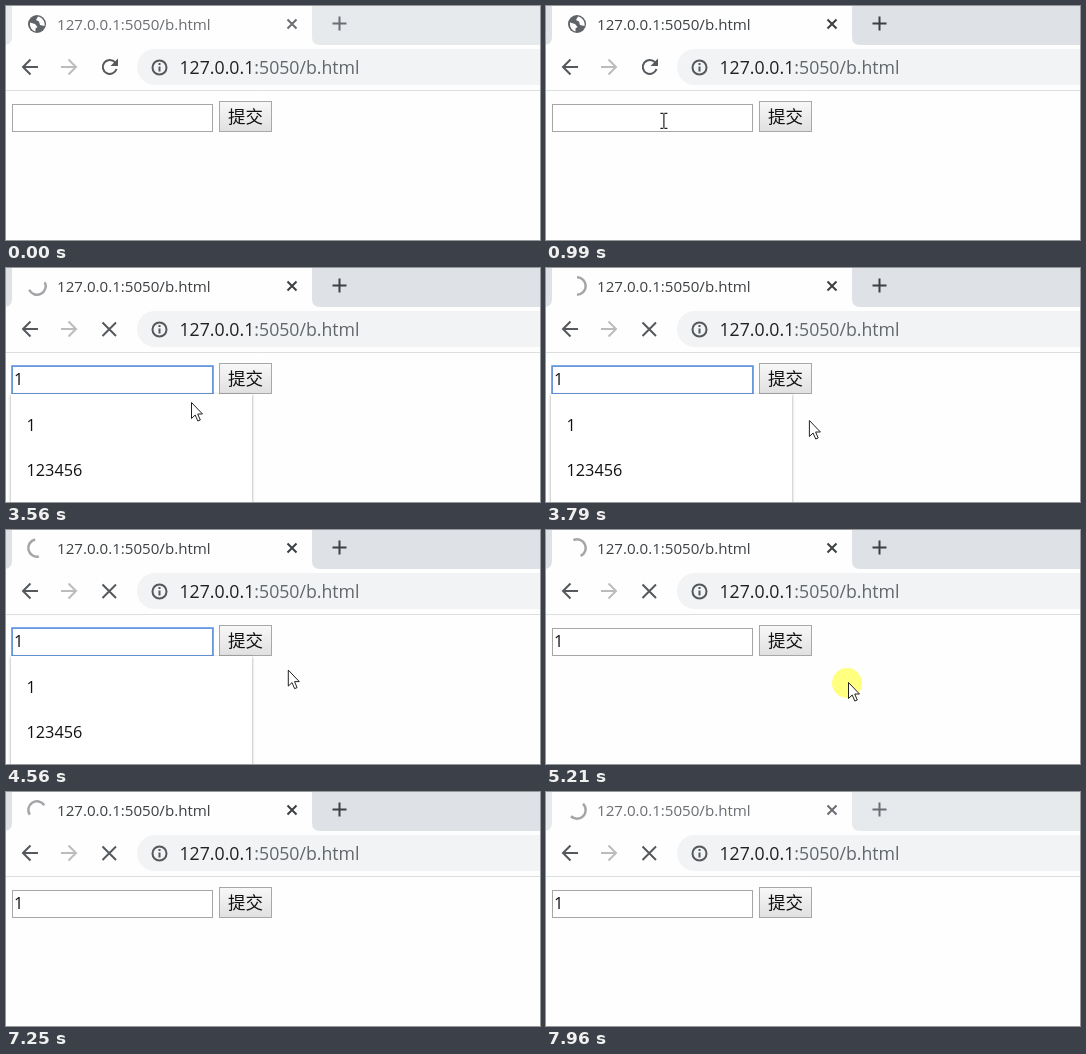
Recreate the animation shown at these times as an HTML page. Size 534 px wide and 234 px high, loop 8 s.

```html
<!DOCTYPE html>
<html lang="zh">
<head>
<meta charset="utf-8">
<title>b.html</title>
<style>
  html, body { margin: 0; width: 100%; height: 100%; overflow: hidden; background: #fefefe; }
  svg { display: block; font-family: "Open Sans", "Noto Sans", sans-serif; --strip: #e7eaed; --ink: #6a6d72; }
  svg.active { --strip: #dee1e6; --ink: #3c4043; }
  .line { fill: none; stroke: #55585c; stroke-width: 2; }
  .ink { stroke: var(--ink); }
  .field { font-size: 16.3px; fill: #111; }
</style>
</head>
<body>
<svg id="stage" width="534" height="234" viewBox="0 0 534 234">
  <rect width="534" height="234" fill="#fefefe"/>

  <!-- tab strip -->
  <rect width="534" height="39" fill="var(--strip)"/>
  <path d="M-2 39Q6 39 6 31V0H306V31Q306 39 314 39Z" fill="#fefefe"/>
  <g id="globe">
    <circle cx="31" cy="18" r="9" fill="#5f6368"/>
    <path d="M24 16.5l5 1.5 2.5 3-2 1.5v3c-4-1-6-5-5.500-9zM32 10.500l-2 3.500 3 1.500 1 3.500 4.500 1c.8-4.500-2-8.500-6.500-9.500z" fill="#fefefe"/>
  </g>
  <path id="spinner" fill="none" stroke="#a3a5a8" stroke-width="2.5"/>
  <text x="51" y="24" font-size="15.1" fill="var(--ink)">127.0.0.1:5050/b.html</text>
  <path class="line ink" d="M281.500 13.500l9 9m0-9l-9 9M326.500 17.500h14m-7-7v14"/>

  <!-- toolbar -->
  <path d="M0 84.500H534" stroke="#dcdee1"/>
  <path class="line" d="M32 61H17m7.500-7.500L17 61l7.500 7.500"/>
  <path class="line" d="M55 61h15m-7.500-7.500L70 61l-7.500 7.500" style="stroke:#babcbe"/>
  <g id="reload">
    <path class="line" d="M109 56.200a7 7 0 1 0 1.500 6.800"/>
    <path d="M112 52.500v7.500h-7.500z" fill="#55585c"/>
  </g>
  <path id="stop" class="line" d="M96.500 54.500l13.500 13.500m0-13.500l-13.500 13.500"/>
  <rect x="131" y="43" width="440" height="36" rx="18" fill="#f1f3f4"/>
  <circle class="line" cx="153.500" cy="61.500" r="7"/>
  <path class="line" d="M153.500 60.500v5m0-8.500v2"/>
  <text x="173.500" y="67.500" font-size="17.7" fill="#63676c"><tspan fill="#202124">127.0.0.1</tspan>:5050/b.html</text>

  <!-- form -->
  <linearGradient id="face" x2="0" y2="1"><stop stop-color="#f8f8f8"/><stop offset="1" stop-color="#e0e0e0"/></linearGradient>
  <rect x="6.500" y="98.500" width="200" height="27" fill="#fff" stroke="#a6a6a6"/>
  <rect id="ring" x="6" y="98" width="201" height="28" fill="none" stroke="#5b94e8" stroke-width="1.6"/>
  <rect x="213.500" y="95.500" width="52" height="30" fill="url(#face)" stroke="#a8a8a8"/>
  <text x="222" y="117" font-size="17.5" fill="#111" style="font-family:'Noto Sans CJK SC','Noto Sans CJK',sans-serif">提交</text>
  <text id="typed" class="field" x="8" y="117">1</text>
  <path id="caret" stroke="#000"/>

  <!-- suggestions -->
  <g id="list">
    <rect id="panel" x="5" y="126" height="130" fill="#fff" style="filter:drop-shadow(0 1px 1.500px #0006)"/>
    <rect id="hover" x="5" y="135" height="45" fill="#eee"/>
    <text class="field" x="20.500" y="163">1</text>
    <text class="field" x="20.500" y="208">123456</text>
  </g>

  <!-- pointer -->
  <g id="pointer">
    <circle id="click" cx="-1" cy="1" r="15" fill="#ffff80"/>
    <path id="arrow" d="M.5.500V16.500L4.200 13 6.800 19 9.300 18 6.700 12H11.500Z" fill="#fff" stroke="#222"/>
    <path id="beam" d="M-3.500-7.500h3m1 0h3M0-7V7M-3.500 7.500h3m1 0h3" stroke="#222" stroke-width="1.2"/>
  </g>
</svg>
<script>
const LOOP = 8000, STEP = 78.3, TURN = 1320;
const $ = id => document.getElementById(id);
const show = (id, on) => $(id).style.display = on ? '' : 'none';
const within = (t, from, to) => t >= from && t < to;
const clamp = v => Math.min(1, Math.max(0, v));

// time, x, y of the pointer
const path = [
  [500, 270, 178], [990, 116, 114], [3400, 116, 114], [3568, 185, 134], [3803, 263, 152],
  [3960, 276, 159], [4190, 276, 140], [5060, 292, 139], [5134, 302, 152], [5290, 302, 152],
  [5600, 270, 240]
];

function pointerAt(t) {
  let i = 1;
  while (i < path.length - 1 && t > path[i][0]) i++;
  const a = path[i - 1], b = path[i], k = clamp((t - a[0]) / (b[0] - a[0]));
  return [a[1] + (b[1] - a[1]) * k, a[2] + (b[2] - a[2]) * k];
}

// Half ring turning counter-clockwise; its tail waits at twelve o'clock at first
function spinnerPath(t) {
  const turns = (t - 2483 - 352 * clamp((t - 5250) / 1150)) / TURN;
  const point = n => {
    const a = Math.PI * (0.5 + 2 * n);
    return `${31 + 8.7 * Math.cos(a)} ${18 - 8.7 * Math.sin(a)}`;
  };
  return `M${point(Math.max(0, turns - 0.5))}A8.7 8.7 0 0 0 ${point(turns)}`;
}

function caretOn(t) {
  if (t < 1940) return within(t, 1140, 1770);
  return t < 2400 || (t < 5130 && Math.floor((t - 2400) / 530) % 2 === 1);
}

function draw(t) {
  const q = 2550 + Math.floor((t - 2534) / STEP) * STEP;
  const loading = t >= 2550, typed = t >= 1940;
  $('stage').classList.toggle('active', within(t, 680, 7870));
  show('globe', !loading);
  show('reload', !loading);
  show('stop', loading);
  show('spinner', loading);
  if (loading) $('spinner').setAttribute('d', spinnerPath(q));

  show('ring', within(t, 1140, 5130));
  show('typed', typed);
  show('caret', caretOn(t));
  $('caret').setAttribute('d', `M${typed ? 17.5 : 9.5} 102V121`);

  const [x, y] = pointerAt(q), width = typed ? 241 : 258;
  const overField = x < 208 && y < 127;
  show('list', within(t, 1390, 5130));
  show('hover', within(x, 5, 5 + width) && within(y, 135, 180));
  for (const id of ['panel', 'hover']) $(id).setAttribute('width', width);

  show('pointer', within(t, 530, 5600));
  $('pointer').setAttribute('transform', `translate(${x.toFixed(1)} ${y.toFixed(1)})`);
  show('click', within(t, 1140, 1240) || within(t, 5130, 5290));
  show('arrow', !overField);
  show('beam', overField);
}

const start = performance.now();
function tick() {
  draw((performance.now() - start) % LOOP);
  requestAnimationFrame(tick);
}
tick();
</script>
</body>
</html>
```
